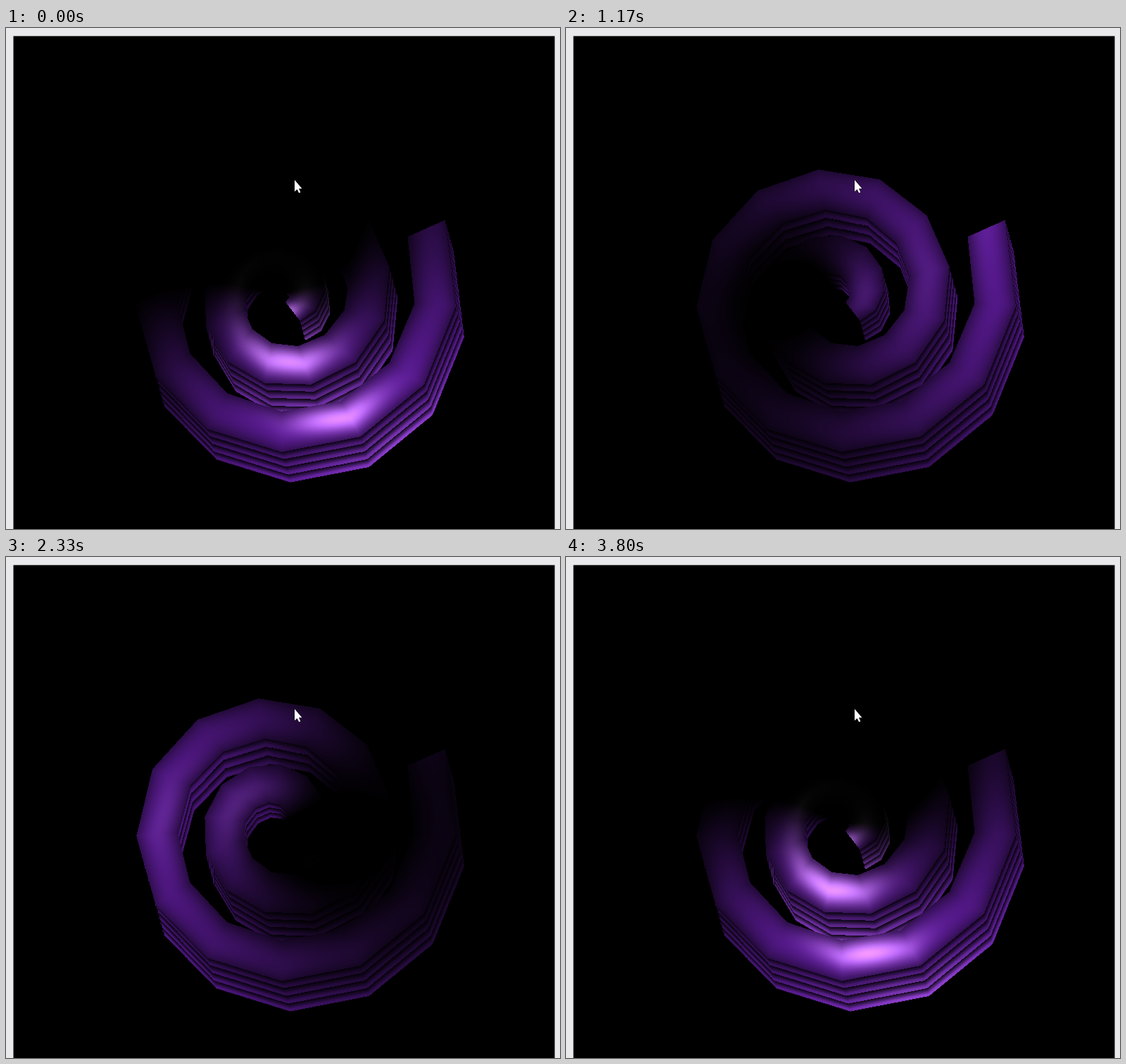
Animation of 787 by 712 pixels, one loop 3830 ms. Source, as an HTML page with a canvas:

```html
<!DOCTYPE html>
<html>
<head>
<meta charset="utf-8">
<style>
html, body { margin: 0; width: 787px; height: 712px; overflow: hidden; background: #e9e9ec; }
canvas { display: block; }
</style>
</head>
<body>
<canvas id="stage" width="787" height="712"></canvas>
<script>
const W = 787, H = 712, LOOP = 3830;
const CX = 389, CY = 378, STEPS = 28, TURN = .497, WIDTH = 57.5;
const FRONT = 1, OUTER = 2, INNER = 3;
const ctx = document.getElementById('stage').getContext('2d', { willReadFrequently: true });

const kind = new Uint8Array(W * H);
const across = new Float32Array(W * H);
const mix = (a, b, k) => a + (b - a) * k;

// Corner i of an Archimedean spiral with straight sides.
function corner(i, inset) {
  const angle = TURN * (i - 1) + .07;
  const r = Math.max(14, 257 - 7.5 * i - inset);
  return { x: CX + r * Math.cos(angle), y: CY + .985 * r * Math.sin(angle), r };
}
const outer = i => corner(i, 0);
const inner = i => corner(i, WIDTH);

// Marks every pixel of a quad; a-b is the near edge, d-c the far one.
function quad(a, b, c, d, type) {
  const nu = 280, nv = 150;
  for (let i = 0; i <= nu; i++) {
    const u = i / nu;
    const x0 = mix(a.x, b.x, u), y0 = mix(a.y, b.y, u);
    const x1 = mix(d.x, c.x, u), y1 = mix(d.y, c.y, u);
    for (let j = 0; j <= nv; j++) {
      const v = j / nv;
      const p = Math.round(mix(y0, y1, v)) * W + Math.round(mix(x0, x1, v));
      kind[p] = type;
      across[p] = v;
    }
  }
}

// The rear edge lies lower; the depth shrinks towards the middle.
function wall(a, b, dx, dy, type) {
  const back = p => {
    const k = Math.min(1, .4 + p.r / 190);
    return { x: p.x + dx * k, y: p.y + dy * k };
  };
  quad(a, b, back(b), back(a), type);
}

for (let i = 0; i < STEPS - 3; i++) wall(inner(i), inner(i + 1), 6, 37, INNER);
for (let i = 0; i < STEPS; i++) wall(outer(i), outer(i + 1), 12, 44, OUTER);
for (let i = 0; i < STEPS; i++) quad(inner(i), inner(i + 1), outer(i + 1), outer(i), FRONT);

// Surface data of a covered pixel: direction, gain, open sky and gloss.
function surface(p) {
  const x = p % W - CX, y = Math.floor(p / W) - CY;
  const r = Math.max(60, Math.hypot(x, y));
  const angle = Math.atan2(y, x) - .26 * (165 - r) / 80;
  const s = { p, c: Math.cos(angle), s: Math.sin(angle), open: .35 + r / 270, tight: (r / 42) ** 2 };
  if (kind[p] === FRONT) {
    const v = across[p] * 2 - 1;
    s.gain = 1 - .42 * v * v;
    s.gloss = Math.exp(-((v + .12) ** 2) / .42);
  } else {
    const isOuter = kind[p] === OUTER;
    const layer = across[p] * (isOuter ? 4 : 3) % 1;
    const groove = Math.min(1, .15 + layer * 1.2);
    s.gain = groove * (isOuter ? .6 + .4 * across[p] : .95);
    s.gloss = isOuter ? .3 * groove * across[p] : 0;
    s.tight *= .3;
  }
  return s;
}

const lit = [];
kind.forEach((k, p) => k && lit.push(surface(p)));

ctx.fillStyle = '#e9e9ec';
ctx.fillRect(0, 0, W, H);
ctx.fillStyle = '#000';
ctx.fillRect(10.5, 11.5, 769, 701);
const image = ctx.getImageData(0, 0, W, H);
const cursor = new Path2D('M410 216V232.5L413.6 229.2L416.2 234.6L418.4 233.6L416 228.3H420.5Z');

function draw() {
  // The lamp circles a point below the middle of the spiral.
  const orbit = (61 - performance.now() % LOOP * .09) * Math.PI / 180;
  const low = Math.sin(orbit);
  const phi = Math.atan2(.45 + low, Math.cos(orbit));
  const lx = Math.cos(phi), ly = Math.sin(phi);
  const flat = .25 - .08 * low, side = .34 + .13 * low;
  const shine = .7 * ((1 + low) / 2) ** 1.6;
  const data = image.data;

  for (const s of lit) {
    const facing = s.c * lx + s.s * ly;
    const light = Math.max(0, flat * s.open + side * facing) * s.gain;
    const spot = s.gloss * shine * Math.exp((facing - 1) * s.tight);
    const o = s.p * 4;
    data[o] = 145 * light + 220 * spot;
    data[o + 1] = 42 * light + 180 * spot;
    data[o + 2] = 238 * light + 220 * spot;
  }
  ctx.putImageData(image, 0, 0);
  ctx.fillStyle = '#fff';
  ctx.strokeStyle = '#000';
  ctx.stroke(cursor);
  ctx.fill(cursor);
  requestAnimationFrame(draw);
}
draw();
</script>
</body>
</html>
```
